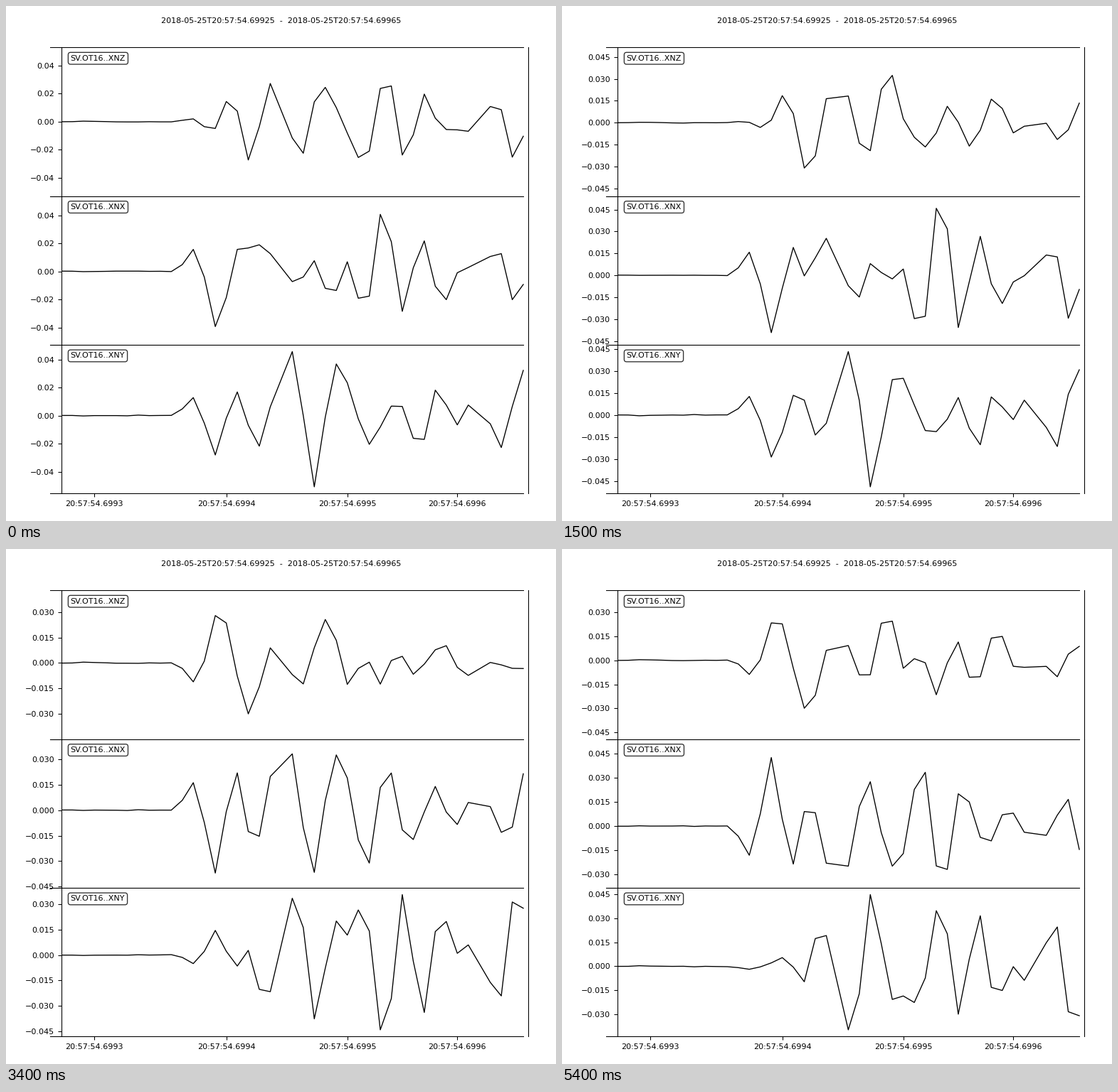
A matplotlib script that plays this animation: 773x725 px, repeating every 5500 ms.

```python
import matplotlib.pyplot as plt
import numpy as np
from matplotlib.animation import FuncAnimation

W, H, DPI = 773, 725, 100
FRAMES, INTERVAL = 55, 100
LEFT, RIGHT = 77.6, 734.35
TOP, PANEL = 58.2, 209.4
X0, DX = 77.7, 15.46          # pixel of sample 0 and sample spacing
SCALE = 0.9667
UNIT = 1 / 1981               # amplitude of one count
NAMES = ["SV.OT16..XNZ", "SV.OT16..XNX", "SV.OT16..XNY"]

# Samples 20 and 38 are missing from the record.
SAMPLES = np.array([k for k in range(43) if k not in (20, 38)])
BASE = UNIT * np.array([
    [0, .1, .8, .5, .2, -.2, -.3, -.3, 0, -.2, -.2,
     2, 4, -7, -9.5, 28.5, 15, -54, -7, 54, -23, -44.5, 28, 48.5, 20, -16,
     -50.5, -41.5, 47, 50.5, -47, -18.5, 39, 5, -11, -11.5, -13.5, 21.5,
     17, -50, -20.5],
    [.3, .2, -.4, -.2, 0, .3, .3, .3, 0, .1, -.3,
     9.5, 31, -8, -78, -37, 31, 33, 37.5, 25, -14.5, -8, 15, -24, -27, 13.5,
     -38, -35, 80.5, 42, -56.5, 5, 43, -21, -40, -2, 5.5, 21,
     25, -40, -18.5],
    [.3, .3, -.4, .1, .1, .1, -.2, .8, .1, .3, .4,
     9.5, 25.5, -10.5, -55.5, -3.5, 33.5, -13.5, -43, 12.5, 90.5, 0, -100.5,
     -2, 73, 46.5, -4.5, -40.5, -16, 13.5, 13, -32, -33.5, 36, 15, -13, 15,
     -11.5, -45, 13, 64],
])

# Sensor orientations: step, X axis, Y axis (in Z, X, Y components).
POSES = [
    (0, (0, 1, 0), (0, 0, 1)),
    (9, (.63, .71, -.31), (.07, .32, .95)),
    (22, (.10, .90, .43), (-.91, -.10, .40)),
    (28, (.63, .678, -.366), (.345, .187, .925)),
    (39, (-.43, -.494, .751), (-.61, -.455, -.65)),
    (48, (-.89, .36, -.30), (.40, .92, -.08)),
    (54, (-.45, -.50, -.74), (.71, .317, -.639)),
]


def orientation(x_axis, y_axis):
    """Nearest rotation matrix with the given X and Y rows."""
    u, _, vt = np.linalg.svd([np.cross(x_axis, y_axis), x_axis, y_axis])
    return u @ vt


STEPS = [pose[0] for pose in POSES]
TURNS = [orientation(*pose[1:]) for pose in POSES]


def between(a, b, u):
    """Turn from a towards b at a constant rate."""
    d = b @ a.T
    angle = np.arccos(np.clip((np.trace(d) - 1) / 2, -1, 1))
    skew = (d - d.T) / (2 * np.sin(angle))
    turn = (np.eye(3) + np.sin(u * angle) * skew
            + (1 - np.cos(u * angle)) * skew @ skew)
    return turn @ a


def rotation(i):
    n = min(np.searchsorted(STEPS, i, side="right") - 1, len(STEPS) - 2)
    u = (i - STEPS[n]) / (STEPS[n + 1] - STEPS[n])
    return between(TURNS[n], TURNS[n + 1], u)


plt.rcParams.update({
    "font.family": "DejaVu Sans",
    "font.size": 8.33 * SCALE,
    "xtick.labelsize": 8.33 * SCALE,
    "ytick.labelsize": 8.33 * SCALE,
    "axes.linewidth": 0.8 * SCALE,
})
for axis in ("xtick", "ytick"):
    plt.rcParams[axis + ".major.size"] = 3.5 * SCALE
    plt.rcParams[axis + ".major.pad"] = 3.5 * SCALE
    plt.rcParams[axis + ".major.width"] = 0.8 * SCALE

fig = plt.figure(figsize=(W / DPI, H / DPI), dpi=DPI, facecolor="white")
fig.text(0.5, 1 - 24.3 / H,
         "2018-05-25T20:57:54.69925  -  2018-05-25T20:57:54.69965",
         ha="center", va="baseline")


def make_panel(row, name):
    bottom = H - TOP - (row + 1) * PANEL
    ax = fig.add_axes([LEFT / W, bottom / H, (RIGHT - LEFT) / W, PANEL / H])
    ax.set_xlim((LEFT - X0) / DX, (RIGHT - X0) / DX)
    for side in ("top", "bottom"):
        ax.spines[side].set_bounds(-1, 42)
    ax.set_xticks([])
    line, = ax.plot(SAMPLES, BASE[row], color="black", lw=SCALE)
    ax.text(0.02, 0.95, name, transform=ax.transAxes, ha="left", va="top",
            bbox=dict(boxstyle="round", fc="w", alpha=0.8, lw=SCALE))
    return ax, line


panels = [make_panel(row, name) for row, name in enumerate(NAMES)]
panels[-1][0].set_xticks([3, 15, 26, 36],
                         [f"20:57:54.699{n}" for n in (3, 4, 5, 6)])


def draw(i):
    traces = rotation(i) @ BASE
    low, high = traces.min(axis=1), traces.max(axis=1)
    span = 1.1 * (high - low).max()
    step, digits = (0.02, 2) if span > 0.104 else (0.015, 3)
    for (ax, line), trace, mid in zip(panels, traces, (low + high) / 2):
        line.set_ydata(trace)
        bottom, top = mid - span / 2, mid + span / 2
        counts = range(int(np.ceil(bottom / step)),
                       int(np.floor(top / step)) + 1)
        ticks = [n * step for n in counts]
        ax.set_yticks(ticks, [f"{t:.{digits}f}".replace("-", "\u2212")
                              for t in ticks])
        ax.set_ylim(bottom, top)
    return [line for _, line in panels]


anim = FuncAnimation(fig, draw, frames=FRAMES, interval=INTERVAL,
                     repeat=True, repeat_delay=0, blit=False)
plt.show()
```
